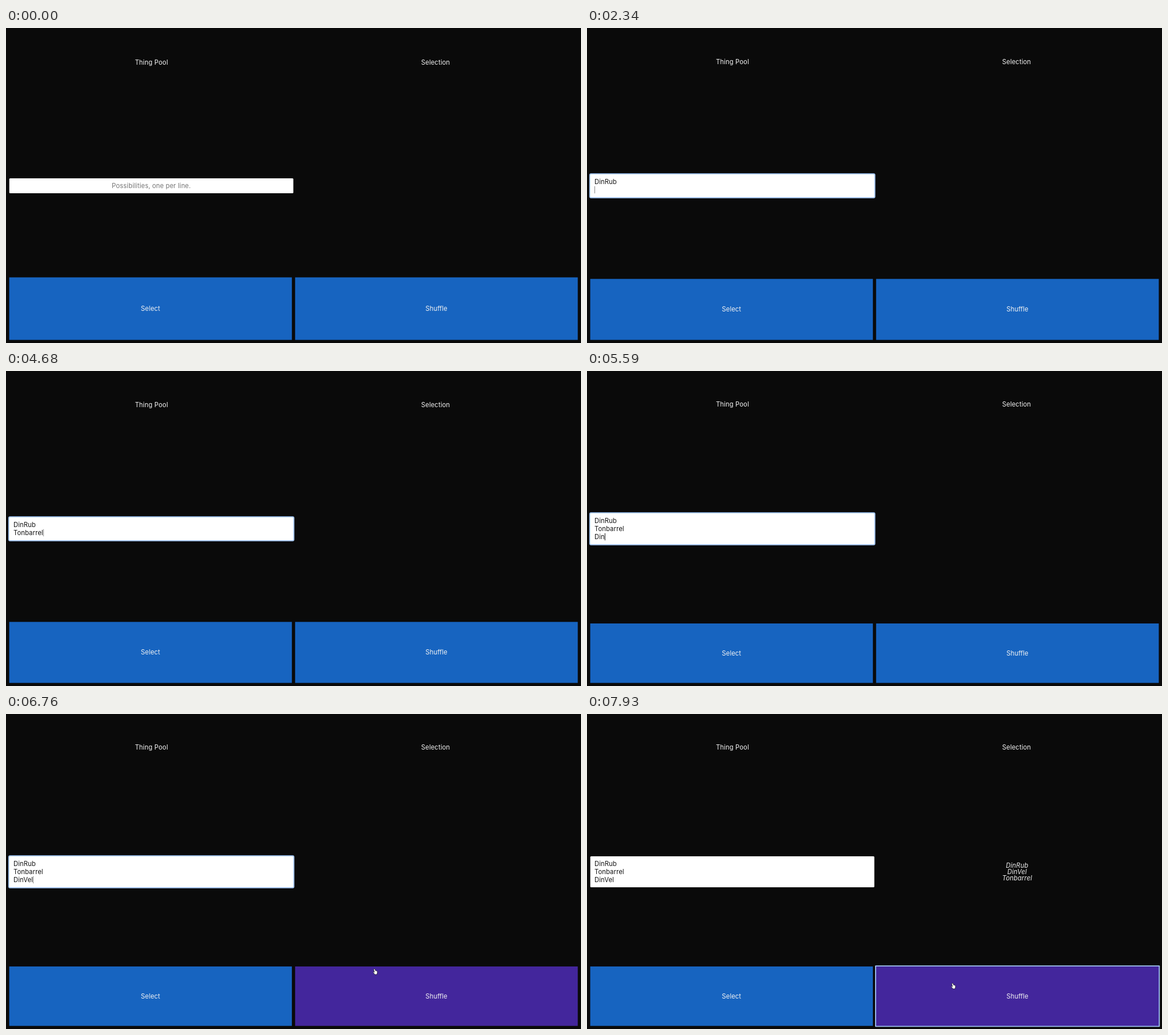
Write an HTML page that moves like this. It is 1000x549 px and loops after 8 s.

```html
<!DOCTYPE html>
<html lang="en">
<head>
<meta charset="utf-8">
<style>
  html, body { margin: 0; width: 100%; height: 100%; overflow: hidden; background: #0a0a0a; }
  svg { display: block; width: 100vw; height: 100vh; }
  text { font: 11.2px Inter, "Open Sans", sans-serif; letter-spacing: .12px; fill: #f4f4f4; white-space: pre; }
  .mid { text-anchor: middle; }
  .typed text { fill: #111; }
  #hint { fill: #757575; }
  .picked text { font-style: italic; }
  .ring { fill: #a3c6f4; }
</style>
</head>
<body>
<svg viewBox="0 0 1000 549">
  <rect width="1000" height="549" fill="#0a0a0a"/>
  <text id="poolTitle" class="mid" x="253">Thing Pool</text>
  <text id="pickTitle" class="mid" x="747">Selection</text>

  <rect id="fieldRing" class="ring" x="4" width="497.5" rx="3"/>
  <rect id="field" x="5.7" width="494" rx="1.5" fill="#fff"/>
  <text id="hint" y="278.7">Possibilities, one per line.</text>
  <g class="typed" id="typed"><text x="13"/><text x="13"/><text x="13"/></g>
  <rect id="caret" width="1" height="12.5" fill="#111"/>

  <g class="picked" id="picked">
    <text class="mid" x="748" y="267.6"/>
    <text class="mid" x="748" y="278.8"/>
    <text class="mid" x="748" y="290"/>
  </g>

  <rect id="shuffleRing" class="ring" x="501" y="438.3" width="495.2" height="107" rx="1"/>
  <rect id="select" x="5.6" width="491.6" fill="#1764c0"/>
  <rect id="shuffle" x="502.8" width="491.6"/>
  <text id="selectLabel" class="mid" x="251.3">Select</text>
  <text id="shuffleLabel" class="mid" x="748.6">Shuffle</text>

  <g id="beam" fill="none" stroke="#777" stroke-width=".9">
    <path d="M-2-4.5Q0-4.5 0-3.5V3.5Q0 4.5-2 4.5M2-4.5Q0-4.5 0-3.5M0 3.5Q0 4.5 2 4.5"/>
  </g>
  <path id="arrow" d="M0 0V9.5L2.2 7.5 3.7 10.8 5.1 10.2 3.7 7H6.6Z" fill="#111" stroke="#fff" stroke-width=".8"/>
  <path id="hand" d="M-1.9-4.5Q-.9-5.2-.3-4.2L.5-1.7Q1.2-2.1 1.7-1.4 2.4-1.7 2.8-1 3.8-1.1 3.9 0L3.7 2.5 2.8 5H-.8Q-1.3 3.6-3.3 1.4-3.7.2-2.6.3L-1.3 1.2-2.5-3.4Q-2.6-4.1-1.9-4.5Z"
    fill="#fff" stroke="#111" stroke-width=".7"/>
</svg>
<script>
const LOOP = 8000;
const FOCUS = 260, HOVER = 6760, CLICK = 7020, RESHUFFLE = 7930;
const NAMES = ["DinRub", "Tonbarrel", "DinVel"];
const SCRIPT = NAMES.join("\n");
const KEY_TIMES = [
  1170, 1430, 1560, 1820, 2080, 2210, 2340,
  2990, 3250, 3380, 3770, 3900, 4290, 4420, 4550, 4680, 4940,
  5330, 5460, 5590, 5850, 6110, 6240
];
// Time, pointer shape, position.
const POINTER = [
  [0, "", 0, 0], [130, "beam", 292, 278], [1560, "", 0, 0],
  [6500, "beam", 310, 288], [6630, "arrow", 480, 372],
  [6760, "hand", 642, 449], [6890, "hand", 637, 474]
];

const $ = id => document.getElementById(id);
const set = (id, attrs) => {
  for (const key in attrs) $(id).setAttribute(key, attrs[key]);
};
const show = (id, on) => set(id, { visibility: on ? "visible" : "hidden" });
const within = (t, from, to) => t >= from && t < to;

function caretOpacity(t) {
  if (!within(t, FOCUS, CLICK) || within(t, 780, 1170) || within(t, 2860, 2990)) return 0;
  return within(t, 2340, 2860) || within(t, 4680, 4940) || t >= 6500 ? 0.5 : 1;
}

function layout(extra) {
  const height = 26 + 14 * extra, top = 275 - height / 2;
  set("field", { y: top, height });
  set("fieldRing", { y: top - 1.7, height: height + 3.4 });
  for (const id of ["poolTitle", "pickTitle"]) set(id, { y: 64.4 - 1.45 * extra });
  const buttonTop = 434.6 + 2.7 * extra;
  for (const id of ["select", "shuffle"]) {
    set(id, { y: buttonTop, height: 543.6 - buttonTop });
    set(id + "Label", { y: 492.9 + 1.4 * extra });
  }
}

function drawField(t) {
  const count = KEY_TIMES.filter(time => time <= t).length;
  const lines = SCRIPT.slice(0, count).split("\n");
  const extra = lines.length - 1;
  const baseline = 278.7 - 7 * extra;
  layout(extra);
  [...$("typed").children].forEach((row, i) => {
    row.textContent = lines[i] || "";
    row.setAttribute("y", baseline + 14 * i);
  });
  const focused = t >= FOCUS;
  show("fieldRing", within(t, FOCUS, CLICK));
  show("hint", count === 0);
  set("hint", { x: focused ? 13 : 252.7, "text-anchor": focused ? "start" : "middle" });
  const width = lines[extra] ? $("typed").children[extra].getComputedTextLength() : 0;
  set("caret", { x: 13 + width, y: baseline + 14 * extra - 10, opacity: caretOpacity(t) });
}

function drawPicked(t) {
  const order = t >= RESHUFFLE ? [0, 2, 1] : [1, 0, 2];
  [...$("picked").children].forEach((row, i) => {
    row.textContent = t >= CLICK ? NAMES[order[i]] : "";
  });
}

function drawPointer(t) {
  const [, shape, x, y] = POINTER.filter(p => p[0] <= t).pop();
  for (const id of ["beam", "arrow", "hand"]) {
    show(id, id === shape);
    set(id, { transform: `translate(${x} ${y})` });
  }
}

function draw(t) {
  drawField(t);
  drawPicked(t);
  drawPointer(t);
  set("shuffle", { fill: t >= HOVER ? "#43269c" : "#1764c0" });
  show("shuffleRing", t >= CLICK);
}

const start = performance.now();
function tick() {
  draw((performance.now() - start) % LOOP);
  requestAnimationFrame(tick);
}
tick();
</script>
</body>
</html>
```
